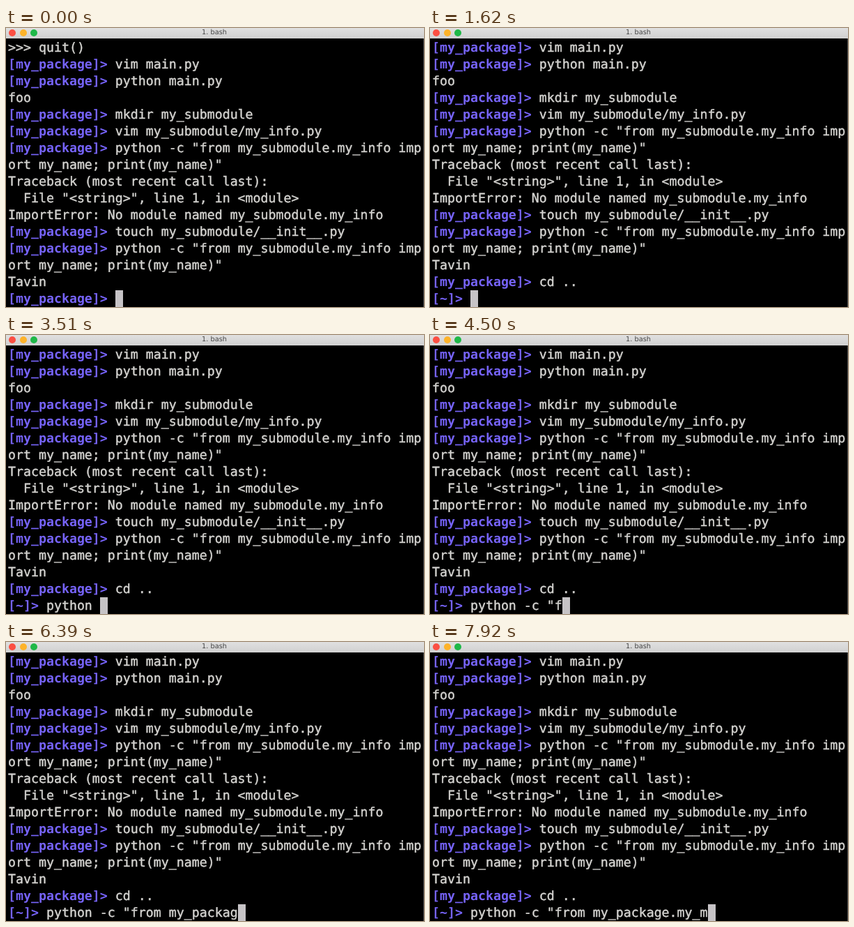
These frames come from a looping animation (600 px wide and 400 px high, 8 s). An HTML page:

```html
<!DOCTYPE html>
<html lang="en">
<head>
<meta charset="utf-8">
<title>1. bash</title>
<style>
  html, body { margin: 0; width: 100%; height: 100%; overflow: hidden; background: #000; }
  #window { position: absolute; left: 0; top: 0; width: 600px; height: 400px; overflow: hidden; background: #000; }
  #window::after { content: ""; position: absolute; right: 0; top: 15px; bottom: 0; width: 1px; background: #4c4c4c; }
  #bar {
    position: absolute; left: 0; top: 0; width: 600px; height: 15px;
    background: linear-gradient(#e0e0e0, #d0d0d0);
    font: 9.8px/14px "DejaVu Sans", sans-serif; color: #444; text-align: center;
    text-indent: -2px; text-rendering: geometricPrecision;
  }
  #bar i { position: absolute; top: 2px; width: 10px; height: 10px; border-radius: 50%; }
  #screen {
    position: absolute; left: 3px; top: 17px; white-space: pre;
    font: 18.25px/24px "DejaVu Sans Mono", monospace; color: #d3d2cf;
    -webkit-text-stroke: .45px #d3d2cf; text-rendering: geometricPrecision;
    font-variant-ligatures: none;
  }
  #screen div { height: 24px; }
  #screen b { color: #7663fa; -webkit-text-stroke: 0; }
  #screen .cursor {
    display: inline-block; position: relative; top: -1px; width: 11px; height: 24px;
    vertical-align: top; background: #c6c3c6;
  }
</style>
</head>
<body>
<div id="window">
  <div id="bar">
    <i style="left:4px;background:#fb4f43"></i>
    <i style="left:19.5px;background:#fdb32a"></i>
    <i style="left:35px;background:#1fb848"></i>
    1. bash
  </div>
  <div id="screen"></div>
</div>
<script>
const LOOP = 8000, TICK = 90, ROWS = 16;
const PACKAGE = "[my_package]> ", HOME = "[~]> ";
const CHECK = ['python -c "from my_submodule.my_info imp', 'ort my_name; print(my_name)"'];

const line = (text, prompt = "") => ({ prompt, text });
const command = text => line(text, PACKAGE);

const log = [
  line(">>> quit()"),
  command("vim main.py"),
  command("python main.py"),
  line("foo"),
  command("mkdir my_submodule"),
  command("vim my_submodule/my_info.py"),
  command(CHECK[0]),
  line(CHECK[1]),
  line("Traceback (most recent call last):"),
  line('  File "<string>", line 1, in <module>'),
  line("ImportError: No module named my_submodule.my_info"),
  command("touch my_submodule/__init__.py"),
  command(CHECK[0]),
  line(CHECK[1]),
  line("Tavin")
];

// Each key is [time in ms, characters typed]; typing is even between keys.
const ENTER = 1170;
const first = { prompt: PACKAGE, text: "cd ..", keys: [[180, 0], [360, 1], [900, 5]] };
const second = {
  prompt: HOME, text: 'python -c "from my_package.my_m',
  keys: [[1980, 0], [2520, 3], [4410, 12], [5670, 21], [7020, 30], [7650, 30], [7740, 31]]
};

function typedCount(keys, t) {
  let [lastTime, lastCount] = keys[0];
  for (const [time, count] of keys) {
    if (t < time) {
      const part = Math.max(0, (t - lastTime) / (time - lastTime));
      return Math.floor(lastCount + (count - lastCount) * part + 1e-6);
    }
    [lastTime, lastCount] = [time, count];
  }
  return lastCount;
}

const escapeText = s => s.replace(/&/g, "&amp;").replace(/</g, "&lt;").replace(/>/g, "&gt;");
const row = ({ prompt, text }, tail = "") =>
  `<div><b>${escapeText(prompt)}</b>${escapeText(text)}${tail}</div>`;

const screen = document.getElementById("screen");
let shown = "";

function render(ms) {
  const t = Math.floor((ms % LOOP) / TICK) * TICK;
  const entered = t >= ENTER;
  const input = entered ? second : first;
  const history = entered ? [...log, command(first.text)] : log;
  const typed = line(input.text.slice(0, typedCount(input.keys, t)), input.prompt);
  const html = history.slice(1 - ROWS).map(entry => row(entry)).join("")
    + row(typed, '<span class="cursor"></span>');
  if (html !== shown) screen.innerHTML = shown = html;
}

const start = performance.now();
function frame() {
  render(performance.now() - start);
  requestAnimationFrame(frame);
}
frame();
</script>
</body>
</html>
```
